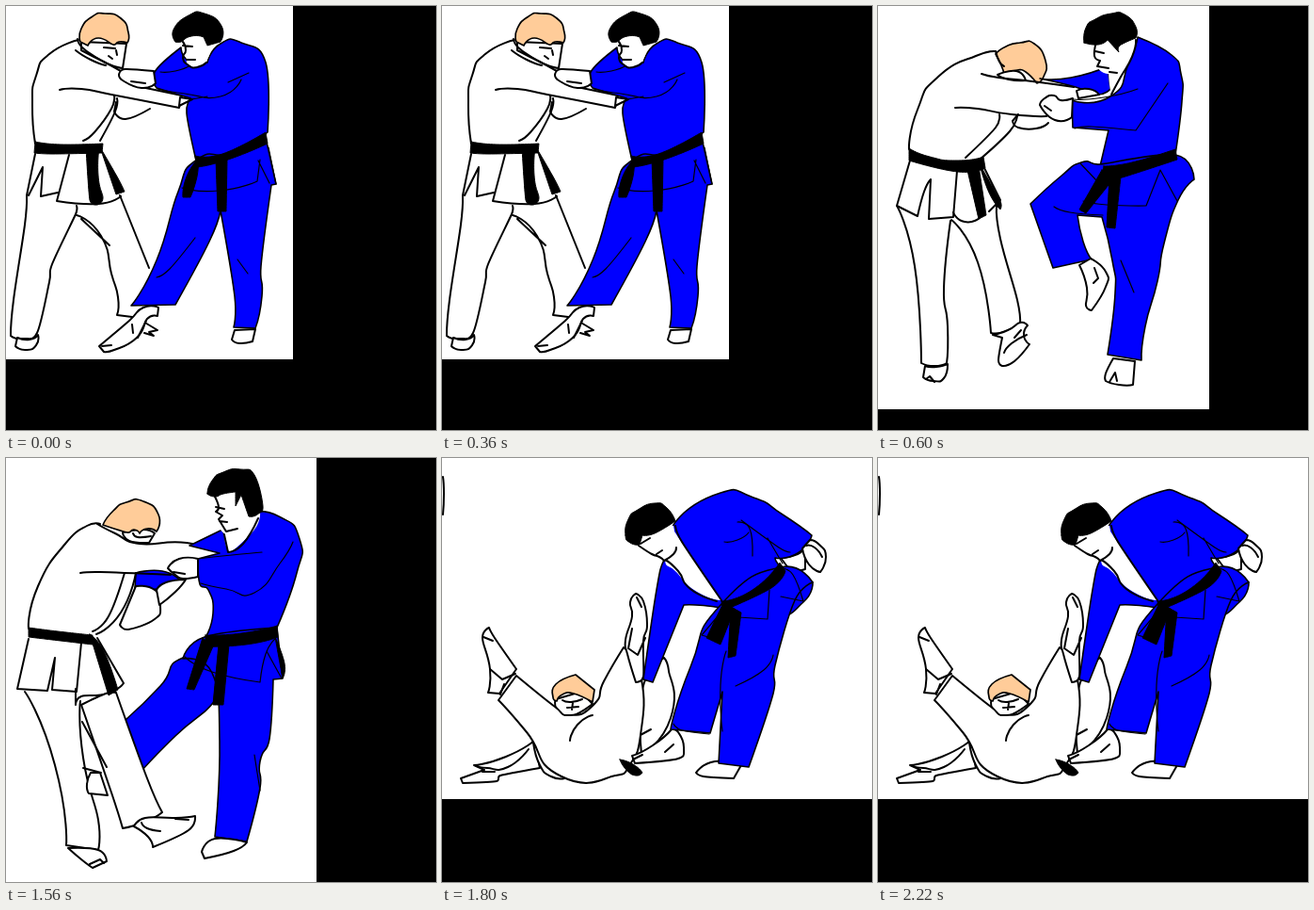
An HTML page for the animation above (2.5 s loop, 457 px wide and 450 px high).

```html
<!DOCTYPE html>
<html lang="en">
<head>
<meta charset="utf-8">
<title>Judo throw</title>
<style>
html, body { margin: 0; width: 100%; height: 100%; overflow: hidden; background: #000; }
svg { display: block; width: 457px; height: 450px; }
path { stroke: #000; stroke-linejoin: round; stroke-linecap: round; }
</style>
</head>
<body>
<svg id="stage" viewBox="0 0 457 450"></svg>
<script>
const NS = 'http://www.w3.org/2000/svg';
const LOOP = 2500;
const stage = document.getElementById('stage');
let layer = stage;

function add(parent, tag, attrs) {
  const el = document.createElementNS(NS, tag);
  for (const k in attrs) el.setAttribute(k, attrs[k]);
  return parent.appendChild(el);
}

// Smooth curve through points; sharp turns stay corners.
function curve(text, closed) {
  const p = text.trim().split(/\s+/).map(s => s.split(',').map(Number));
  const n = p.length;
  const pick = i => closed ? p[(i + n) % n] : p[i];
  const tangent = i => {
    const a = pick(i - 1), b = pick(i), c = pick(i + 1);
    if (!a || !c) return [0, 0];
    const u = [b[0] - a[0], b[1] - a[1]], v = [c[0] - b[0], c[1] - b[1]];
    const lu = Math.hypot(...u), lv = Math.hypot(...v);
    if (u[0] * v[0] + u[1] * v[1] < 0.5 * lu * lv) return [0, 0];
    const m = Math.min(lu, lv) / (lu + lv) / 1.5;
    return [(u[0] + v[0]) * m, (u[1] + v[1]) * m];
  };
  let d = 'M' + p[0];
  for (let i = 0; i < (closed ? n : n - 1); i++) {
    const j = (i + 1) % n, a = p[i], b = p[j], s = tangent(i), e = tangent(j);
    d += `C${a[0] + s[0]},${a[1] + s[1]} ${b[0] - e[0]},${b[1] - e[1]} ${b}`;
  }
  return d + (closed ? 'Z' : '');
}

const pen = (fill, width, closed) => text => add(layer, 'path', {
  d: text.split('/').map(s => curve(s, closed)).join(''),
  fill, 'stroke-width': width
});
const skin = pen('#fff', 2, true);
const plain = pen('#fff', 0, true);
const blue = pen('#00f', 1.6, true);
const black = pen('#000', 1, true);
const blond = pen('#fc9', 1.7, true);
const line = pen('none', 2, false);
const fold = pen('none', 1.2, false);

function grip() {
  // white judoka
  skin('80,38 80,47 110,62 124,66 128,40');
  blond('79,38 80,24 92,11 105,8 122,13 130,28 129,39 120,38 114,41 98,34 87,42');
  line('77,36 46,51 32,74 28,105 31,146');
  line('76,35 81,44 95,54 122,69 / 104,44 116,45 / 117,47 118,52 / 109,53 113,56');
  line('74,47 90,57 106,63 / 57,89 80,88 112,94 184,108 187,95 134,84');
  line('115,95 112,109 94,134 82,143 / 118,98 116,112 100,143');
  line('117,102 115,112 127,120 153,109');
  line('31,157 22,201 / 24,201 39,171 37,202 55,198 / 67,158 54,207 98,210 122,202');
  line('22,202 20,232 8,312 5,350 17,353 33,347 46,293 49,274 74,221 75,212');
  line('75,222 101,244 112,284 119,309 118,328 134,330 / 80,226 110,254 / 121,201 152,278');
  skin('12,352 10,361 21,365 32,360 34,349 25,354');
  line('146,335 161,344 152,346 157,350 147,347');
  black('31,144 58,147 103,146 102,156 50,157 30,156');
  black('85,150 99,150 98,180 103,204 97,211 89,206');
  black('100,150 118,181 126,197 117,200');
  // blue judoka
  blue('158,70 186,44 194,58 214,60 228,40 250,39 276,60 278,134 240,156 202,164 192,114 196,98 160,87');
  blue('203,163 183,197 160,270 133,318 180,317 216,250 228,217 243,308 242,341 265,342 272,308 271,276 282,190 287,189 276,140 240,156');
  fold('187,193 226,196 267,186 270,163 / 268,164 280,188 / 229,205 228,219 / 279,150 287,189');
  fold('164,70 180,69 196,63 / 161,88 190,93 228,96 250,78 / 197,99 214,96 / 236,81 258,71');
  fold('160,288 174,279 201,246 / 246,269 257,284');
  plain('184,36 190,42 192,61 203,65 213,58 218,44');
  line('188,38 191,47 188,55 194,63 203,65 213,60 / 188,42 198,43 / 192,57 201,57');
  black('180,38 178,25 194,10 211,8 229,21 228,38 214,42 210,33 197,32 186,38');
  skin('120,73 126,67 157,69 159,82 144,87 124,79');
  skin('185,97 198,99 184,106');
  line('133,80 148,82');
  black('201,159 230,157 276,134 278,146 236,163 203,171');
  black('204,163 203,181 196,203 188,203 192,181 / 223,162 235,162 234,218 225,218');
  skin('146,320 131,334 99,361 104,367 115,365 139,352 150,332 161,329 162,320');
  line('134,338 135,347 / 102,361 112,360 / 140,352 149,334');
  skin('243,344 240,354 248,358 262,356 265,343');
}

function lift() {
  line('125,48 104,53 64,75 42,110 33,152');
  blond('125,51 136,43 151,39 166,40 178,58 176,75 169,82 157,70 148,68 134,72 131,63');
  skin('127,73 147,69 157,79 139,78');
  line('125,48 129,59 134,64 / 110,72 128,76 164,80 208,86 / 82,108 106,109 142,115 179,117');
  line('129,115 125,129 93,161 / 148,116 140,133 108,163');
  line('149,115 143,122 149,129 168,130 181,124');
  line('34,164 20,212 42,223 49,197 56,184 54,226 80,224 84,175');
  line('80,219 92,229 108,225 / 118,218 130,206 112,170');
  line('20,212 39,276 46,379 60,382 73,379 74,340 70,300 77,228');
  line('78,227 106,272 120,347 134,346 151,338 148,312 130,247 126,212');
  skin('50,382 48,394 59,398 70,395 74,380 62,383');
  line('51,396 55,393 60,399');
  skin('122,349 132,352 128,376 132,382 145,377 161,359 155,350 159,339 151,336 138,344');
  line('145,352 152,344 / 134,368 142,358 158,349');
  black('33,151 55,160 85,164 112,160 114,172 85,176 33,164');
  black('94,170 107,170 115,222 107,226 / 108,168 130,207 130,216 118,198');
  // blue judoka
  blue('172,77 205,76 244,64 247,88 232,94 210,86');
  blue('276,33 312,52 322,72 323,101 316,158 236,170 245,132 207,129 206,100 247,96 266,62');
  blue('236,168 316,158 336,184 319,206 304,252 297,292 284,340 280,376 244,370 252,305 249,270 238,224 212,222 218,250 227,269 186,278 162,210 194,181 216,166');
  plain('246,62 258,44 274,36 270,53 248,94');
  line('274,36 270,54 257,77 248,94');
  fold('207,99 240,97 276,88 / 209,130 227,128 274,132 308,82 / 187,213 204,219 239,222');
  fold('218,207 243,211 285,212 300,174 318,207 / 215,167 232,185 / 258,270 272,304');
  plain('226,37 231,47 236,60 234,66 244,72 256,68 262,45');
  line('232,38 230,53 236,58 233,64 245,66 / 231,48 240,50 / 246,70 254,71');
  black('219,39 221,23 231,14 248,8 262,9 274,22 274,34 257,42 256,49 244,36 234,41');
  skin('172,105 177,98 187,95 194,100 207,98 206,118 188,121');
  line('177,106 184,111');
  skin('211,90 224,88 235,94 213,98');
  black('240,170 270,166 316,152 318,163 256,183 238,185');
  black('238,174 253,180 221,220 214,216 / 246,181 258,181 252,236 243,235');
  skin('214,275 222,299 221,318 227,323 242,298 242,282 226,268');
  line('230,278 234,289 229,294');
  skin('250,374 242,390 242,398 256,402 271,402 273,377');
  line('246,399 252,389 254,398');
}

function hook() {
  blue('138,122 166,120 185,130 160,139 137,138');
  line('100,70 86,72 63,91 34,136 24,181');
  skin('124,79 131,88 152,90 158,80 146,76');
  blond('103,71 114,56 128,47 146,46 162,60 160,78 150,75 142,80 136,76 129,79');
  line('97,70 116,80 142,91 192,90 228,102 / 135,80 140,84 154,83 / 79,122 100,121 175,124');
  line('126,122 109,168 92,184 / 138,122 122,164 96,187');
  skin('138,136 158,140 164,156 158,171 130,182 121,177');
  skin('160,140 170,132 191,129 180,142 163,156');
  line('24,192 12,245 44,247 52,212 49,246 75,248 80,196');
  line('74,245 74,262 80,253 108,250 125,239 97,191');
  line('20,248 52,326 64,411 98,416 98,384 82,318 79,258');
  // blue sweeping leg goes under the white one
  blue('188,212 164,242 127,278 145,331 180,295 226,252 240,210');
  skin('80,262 112,355 124,393 148,386 166,376 150,340 117,249 106,250');
  line('81,280 107,328');
  skin('86,346 90,334 100,334 108,358 88,356');
  line('82,329 101,334');
  skin('66,414 80,426 92,435 107,428 98,416');
  line('89,431 100,426 104,430');
  skin('136,391 148,382 180,382 201,380 194,395 156,413 151,402');
  line('144,387 150,393 164,396 / 180,383 194,384');
  black('24,180 55,184 92,188 92,198 24,190');
  black('89,187 104,205 119,246 109,252');
  // blue judoka
  blue('195,93 230,76 238,90 260,58 290,62 312,86 309,122 288,180 211,192 220,165 215,140 206,134 204,107 227,101');
  blue('211,190 288,180 294,234 284,235 280,298 270,322 270,350 256,407 222,402 227,300 219,228 188,213');
  plain('234,77 253,61 270,58 264,76 238,101');
  line('231,77 236,100 252,91 268,64');
  fold('204,107 240,103 272,100 / 207,133 234,139 264,143 291,112 305,89');
  fold('190,211 219,227 270,238 276,208 286,192 / 277,205 293,234 / 264,315 270,353');
  plain('222,40 226,53 222,58 228,76 238,79 252,66 248,38');
  line('222,41 226,52 223,57 230,61 226,65 234,78 246,75 / 223,52 232,54 / 227,67 235,68');
  black('214,38 219,24 231,15 249,12 264,18 273,51 267,60 258,62 250,39 244,51 244,36 231,38 222,41');
  skin('172,117 184,107 204,107 204,126 188,128 180,124');
  line('178,121 190,123');
  black('212,188 250,186 288,178 289,190 255,198 212,200');
  black('209,191 220,200 200,246 192,245 / 226,198 237,198 231,262 220,262');
  black('286,190 296,218 294,234');
  skin('222,404 208,418 211,425 242,417 256,408');
}

function fall() {
  line('1,20 2,38 1,60');
  // white judoka on the mat
  skin('98,300 68,317 34,326 45,331 20,340 22,345 58,343 62,337 104,329');
  line('35,326 48,329 70,328 92,309 / 43,333 56,333');
  skin('97,302 104,326 116,338 130,340 128,320');
  skin('213,245 236,212 241,226 243,276 212,314');
  line('210,275 209,295 222,288');
  skin('121,256 122,266 136,274 160,261 148,248');
  blond('118,254 121,240 142,230 162,246 160,259 140,250 128,251 122,258');
  line('128,257 137,259 149,256 / 139,260 138,267 / 133,265 145,264');
  skin('60,257 79,231 120,264 136,273 161,262 172,237 193,201 212,235 211,294 200,325 184,337 127,338 90,291');
  line('160,273 144,283 136,300');
  skin('195,193 202,168 200,153 206,144 214,152 218,177 214,194 214,232 206,238 197,208');
  line('202,181 198,202 208,209 216,191 / 207,148 212,158');
  skin('43,191 50,180 56,191 79,224 61,250 49,249 51,224');
  line('51,224 64,235 78,229 / 44,190 54,194 / 62,251 66,240');
  black('189,320 203,325 213,334 206,337 196,331');
  // blue judoka
  skin('244,288 224,305 202,316 205,324 251,319 257,307 251,291');
  line('203,320 213,315 / 237,312 246,304');
  skin('290,322 270,334 278,338 310,340 318,326');
  skin('360,106 378,102 386,95 386,118 372,122');
  blue('248,68 296,37 331,42 362,60 393,82 378,101 354,106 361,116 394,132 384,153 350,170 297,159 257,156 224,238 214,235 228,140 236,108 248,98');
  blue('297,155 360,116 394,132 375,151 354,220 352,250 326,328 294,324 298,248 285,292 243,288 264,222');
  plain('247,78 281,128 297,151 271,142 249,121 237,107');
  line('248,72 255,89 297,151 / 237,108 251,120 264,139 292,152');
  fold('314,68 327,75 330,104 / 300,89 314,87 326,79 / 318,66 358,95 370,100 / 346,85 362,112');
  fold('348,140 346,171 315,169 / 361,117 373,124 384,152 360,147 / 293,168 276,188 297,194');
  fold('302,205 296,241 298,290 / 312,242 342,225 352,209 / 246,282 255,289 284,293');
  plain('208,88 214,98 232,108 244,103 248,91 246,72 222,75');
  line('209,93 223,102 231,105 236,109 246,102 249,95 / 211,91 221,85 / 228,102 234,98');
  black('195,82 198,65 208,55 226,48 239,53 248,67 226,80 213,82 210,92 200,90');
  skin('383,96 391,87 401,92 408,105 402,121 390,113');
  line('387,93 396,95 404,105');
  black('297,152 330,140 359,111 365,120 350,138 299,162');
  black('299,154 311,160 296,198 281,191 / 307,158 318,164 312,210 304,212');
}

function pose(at, width, height, draw) {
  const g = layer = add(stage, 'g', { display: 'none' });
  add(g, 'rect', { width, height, fill: '#fff' });
  draw();
  return { at, g };
}

add(stage, 'rect', { width: 457, height: 450 });
const poses = [
  pose(0, 305, 375, grip),
  pose(600, 352, 428, lift),
  pose(1200, 330, 450, hook),
  pose(1800, 457, 362, fall)
];

function render(time) {
  const t = time % LOOP;
  const now = poses.filter(p => p.at <= t).length - 1;
  poses.forEach((p, i) => p.g.setAttribute('display', i === now ? 'inline' : 'none'));
}

const start = performance.now();
function tick() {
  render(performance.now() - start);
  requestAnimationFrame(tick);
}
tick();
</script>
</body>
</html>
```
